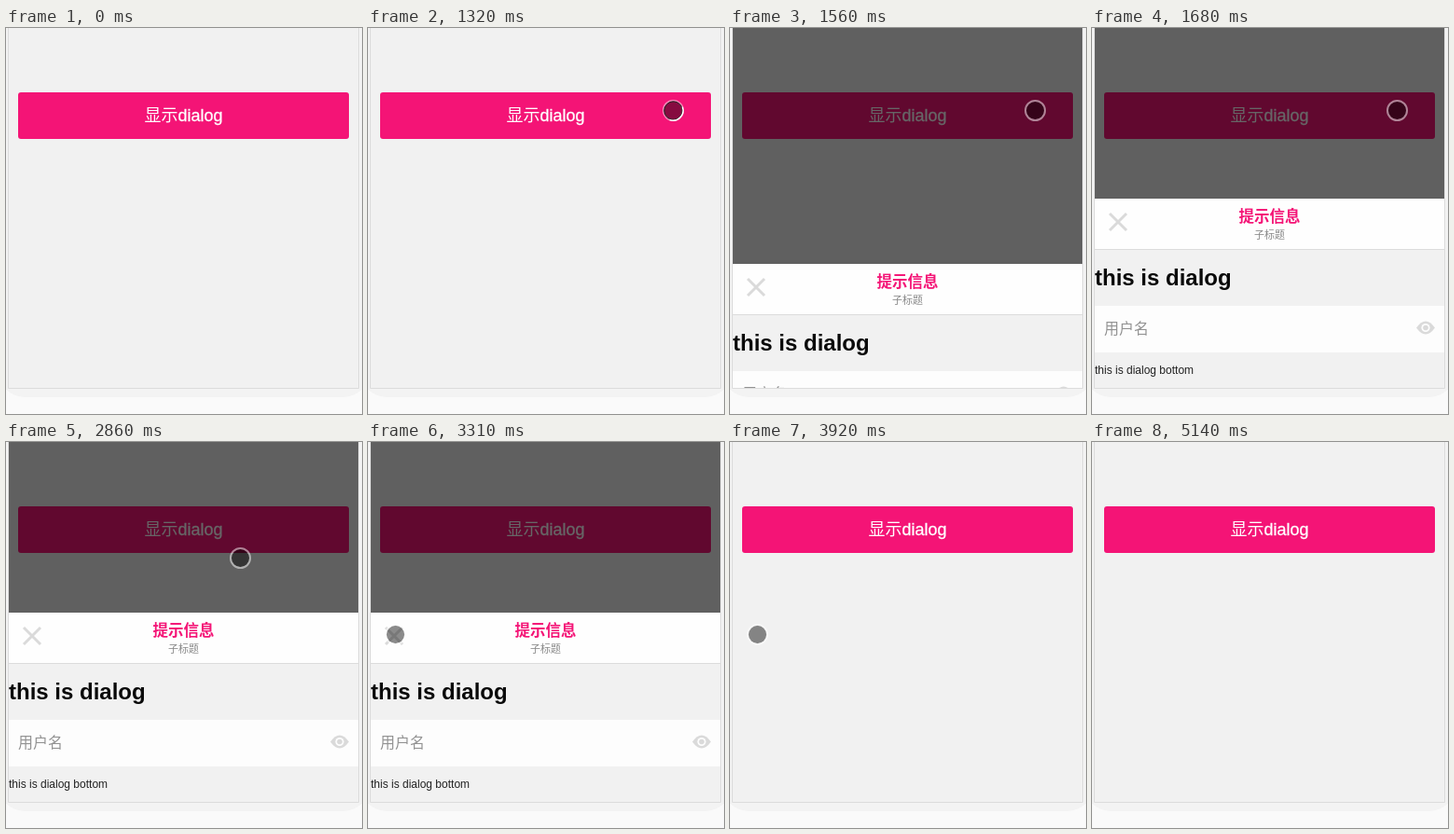
Animation, 382 px wide and 414 px high, one loop 5510 ms. Source, as an HTML page:

```html
<!DOCTYPE html>
<html lang="zh">
<head>
<meta charset="utf-8">
<style>
  html, body { margin: 0; width: 100%; height: 100%; overflow: hidden; background: #fafafa; }
  svg { display: block; }
  text { font-family: "Liberation Sans", Arial, "Noto Sans CJK SC", "Noto Sans CJK", sans-serif; }
  .thin { font-weight: 300; }
  .bold { font-weight: 700; }
</style>
</head>
<body>
<svg width="382" height="414" viewBox="0 0 382 414">
  <defs>
    <clipPath id="screen"><rect x="3" width="375" height="386"/></clipPath>
  </defs>

  <rect x="-8" y="-60" width="398" height="456" rx="28" fill="#f3f3f3"/>
  <rect x="2.5" y="-5" width="376" height="391.5" rx="1" fill="#f1f1f1" stroke="#dcdcdc"/>

  <g clip-path="url(#screen)">
    <g id="button">
      <rect x="13" y="69" width="355" height="50" rx="3" fill="#f41476"/>
      <text x="190.5" y="100" font-size="18" text-anchor="middle" fill="#fff"><tspan class="thin">显示</tspan><tspan stroke="#fff" stroke-width=".3">dialog</tspan></text>
    </g>

    <rect id="shade" x="3" width="375" height="386"/>

    <g id="flash">
      <rect x="13" y="69" width="355" height="50" fill="#504d79"/>
      <text x="190.5" y="100" font-size="18" text-anchor="middle" fill="#558a9c"><tspan class="thin">显示</tspan><tspan stroke="#558a9c" stroke-width=".3">dialog</tspan></text>
    </g>

    <g id="dialog">
      <rect x="3" y="183" width="375" height="203" fill="#f1f1f1"/>
      <rect x="3" y="183" width="375" height="54" fill="#fefefe"/>
      <rect x="3" y="237" width="375" height="1" fill="#dcdcdc"/>
      <path d="M19 199L37 217M37 199L19 217" stroke="#dadada" stroke-width="3"/>
      <text class="bold" x="190.5" y="208" font-size="16.5" text-anchor="middle" fill="#f41476">提示信息</text>
      <text x="190.5" y="226" font-size="11" text-anchor="middle" fill="#888">子标题</text>
      <text class="bold" x="3" y="276" font-size="24" fill="#0a0a0a">this is dialog</text>
      <rect x="3" y="298" width="375" height="50" fill="#fdfdfd"/>
      <text class="thin" x="13" y="328" font-size="16" fill="#929292">用户名</text>
      <path d="M348 321.5Q358 307.5 368 321.5Q358 335.5 348 321.5Z" fill="#dadada"/>
      <circle cx="358" cy="321.5" r="4.6" fill="#fdfdfd"/>
      <circle cx="358" cy="321.5" r="2.8" fill="#dadada"/>
      <text x="3" y="371" font-size="12" fill="#222">this is dialog bottom</text>
    </g>
  </g>
  <path d="M2.5 0V386.5H378.5V0" fill="none" stroke="#dcdcdc"/>

  <g id="cursor">
    <circle r="9.7" fill="#000" fill-opacity=".45"/>
    <circle r="10.5" fill="none" stroke="#fff" stroke-opacity=".5" stroke-width="2"/>
    <g id="press" fill="none">
      <circle r="9.7" stroke="#222"/>
      <circle cx=".5" cy=".5" r="10.2" stroke="#000" stroke-opacity=".25"/>
      <path d="M9.8 -4A10.6 10.6 0 0 1 -4 9.8" stroke="#fff" stroke-width="1.4"/>
    </g>
  </g>
</svg>

<script>
const LOOP = 5510;
const HIDDEN = 203;
const part = id => document.getElementById(id);

// Each step holds until the next and changes only the listed values.
const steps = [
  { at: 0, cursor: null, press: false, shade: 0, drop: HIDDEN, flash: false },
  { at: 780, cursor: [373.5, 95.5] },
  { at: 930, cursor: [327.5, 88.5] },
  { at: 1320, press: true },
  { at: 1440, press: false, shade: .6, flash: true },
  { at: 1560, flash: false, drop: 70 },
  { at: 1680, drop: 0 },
  { at: 2860, cursor: [251.5, 124.5] },
  { at: 3010, cursor: [106.5, 170.5] },
  { at: 3160, cursor: [48.5, 198.5] },
  { at: 3310, cursor: [29.5, 206.5] },
  { at: 3620, press: true },
  { at: 3770, press: false, shade: .555, drop: 45 },
  { at: 3920, shade: 0, drop: HIDDEN },
  { at: 4900, cursor: [125, 300] },
  { at: 5020, cursor: [234.5, 401.5] },
  { at: 5140, cursor: null }
];

const show = (id, visible) => part(id).setAttribute("visibility", visible ? "visible" : "hidden");

function draw(time) {
  const state = Object.assign({}, ...steps.filter(step => step.at <= time));
  show("cursor", state.cursor);
  show("press", state.cursor && state.press);
  show("flash", state.flash);
  part("shade").setAttribute("opacity", state.shade);
  part("dialog").setAttribute("transform", `translate(0 ${state.drop})`);
  if (state.cursor) part("cursor").setAttribute("transform", `translate(${state.cursor})`);
}

const start = performance.now();
function tick() {
  draw((performance.now() - start) % LOOP);
  requestAnimationFrame(tick);
}
tick();
</script>
</body>
</html>
```
